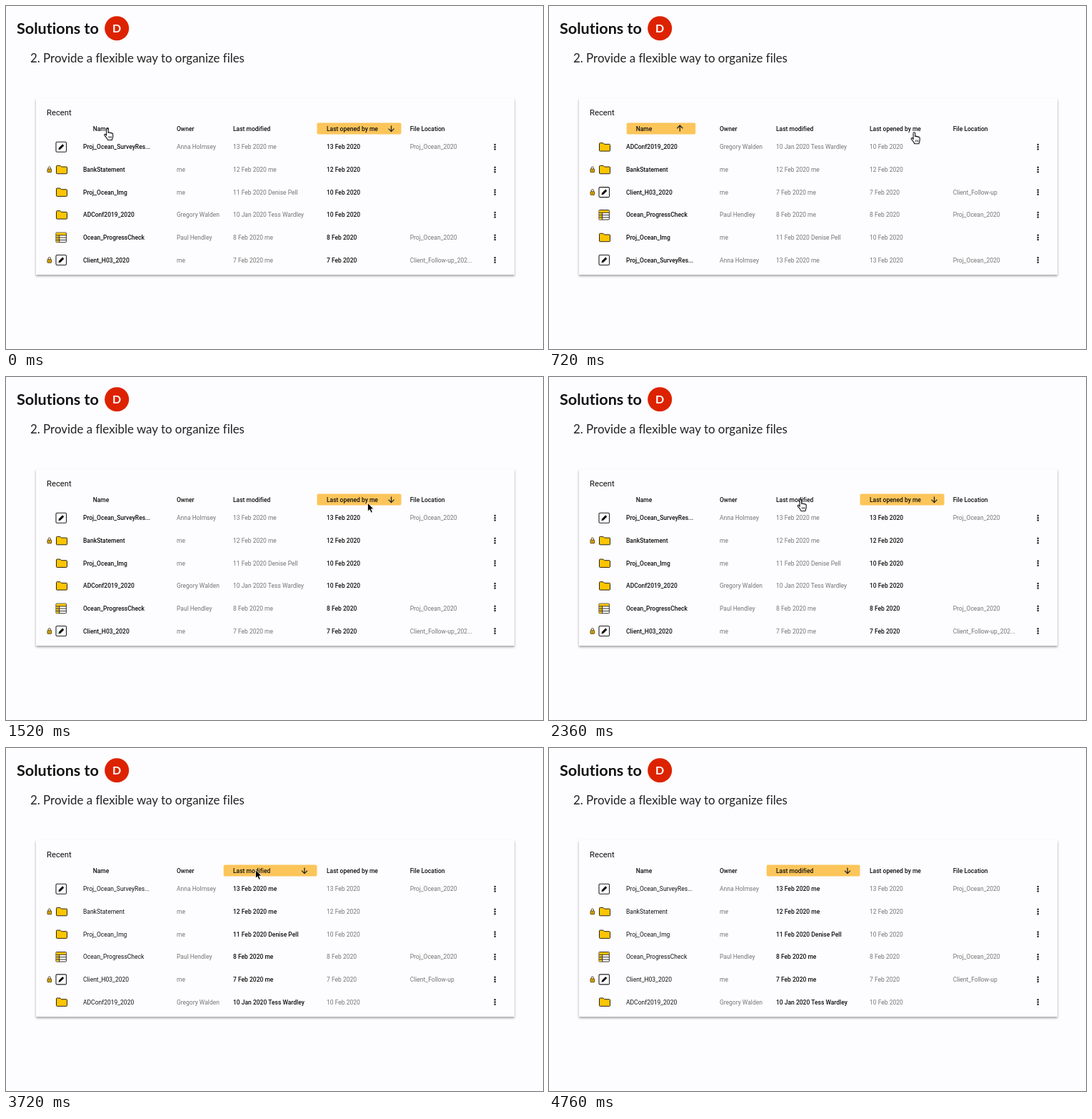
These frames come from a looping animation (752x480 px, 4.88 s). An HTML page:

```html
<!DOCTYPE html>
<html lang="en">
<head>
<meta charset="utf-8">
<title>Sortable file list</title>
<style>
  html, body { margin: 0; width: 100%; height: 100%; overflow: hidden; background: #fdfcfe; }
  svg { position: absolute; left: 0; top: 0; font: 8.5px Roboto, sans-serif; fill: #757575; font-variant-ligatures: none; }
  .card { position: absolute; left: 42px; top: 129px; width: 670px; height: 247px;
          background: #fdfcfe; box-shadow: 0 2px 3px rgba(0, 0, 0, .36); }
  .title { font-family: Lato, sans-serif; font-size: 21.6px; font-weight: 700; fill: #111; }
  .subtitle { font-family: Lato, sans-serif; font-size: 16.9px; fill: #222; }
  .badge { font-family: Lato, sans-serif; font-size: 16px; font-weight: 700; fill: #fff; }
  .recent { font-size: 11.3px; fill: #111; }
  .dark { fill: #151515; }
  .medium { font-weight: 500; fill: #111; }
</style>
</head>
<body>
<div class="card"></div>
<svg width="752" height="480" viewBox="0 0 752 480">
  <defs>
    <clipPath id="cardClip"><rect x="42" y="129" width="670" height="248"/></clipPath>
    <g id="doc" stroke="#222">
      <rect x="70" y="-7" width="14.5" height="14" rx="1.5" fill="#fff" stroke-width="1.1"/>
      <path d="M73.4 4l.8-3 5-5 2.1 2.1-5 5z" fill="#111" stroke="none"/>
    </g>
    <g id="folder" stroke="#2b2410" stroke-linejoin="round">
      <path d="M70.5 5V-4.6q0-1 1-1h4.4l1.6 1.7h7q1 0 1 1V5q0 .8-1 .8H71.5q-1 0-1-.8z" fill="#fdc500"/>
    </g>
    <g id="sheet" stroke="#333">
      <rect x="70" y="-6.8" width="14.4" height="13.6" rx=".8" fill="#fff"/>
      <path d="M70.5-6.3h13.4v3.4H70.5zM70.5-3h4.2v9.3h-4.2z" fill="#fdc500" stroke="none"/>
      <path d="M70-3h14.4M70 .3h14.4M70 3.6h14.4M74.7-3V6.8" fill="none"/>
    </g>
    <g id="lock" stroke="#4a3a08" stroke-width=".9">
      <path d="M59.1-.8V-2.3a1.7 1.7 0 0 1 3.4 0v1.5" fill="none"/>
      <rect x="58" y="-.9" width="5.6" height="4.6" rx=".6" fill="#e9b000"/>
      <path d="M60.8.7v1.3"/>
    </g>
    <g id="more" fill="#222">
      <circle cx="684.7" cy="-3.2" r="1.25"/><circle cx="684.7" r="1.25"/><circle cx="684.7" cy="3.2" r="1.25"/>
    </g>
  </defs>

  <text class="title" x="15" y="38.5">Solutions to</text>
  <circle cx="155.2" cy="31.3" r="17" fill="#dd2200"/>
  <text class="badge" x="155.2" y="37" text-anchor="middle">D</text>
  <text class="subtitle" x="34" y="79">2. Provide a flexible way to organize files</text>
  <text class="recent" x="57" y="153.4">Recent</text>

  <g id="views"></g>
  <g clip-path="url(#cardClip)">
    <path id="arrow" d="M0 0V11.8L2.7 9.3 4.7 13.8 6.8 12.9 4.9 8.5H8.6Z" fill="#000" stroke="#fff" stroke-width=".8"/>
    <g id="hand" fill="#fff" stroke="#111" stroke-width="1.1" stroke-linejoin="round">
      <path d="M3.6 10.3V1.8a1.3 1.3 0 0 1 2.6 0V6.5c.3-1 2.3-.9 2.4.3.4-.8 2.1-.6 2.2.5.5-.6 1.9-.2 1.9 1v3.2c0 2-1 2.6-1.2 5H5.4C5.1 14.5 2.9 12.500 1 10.200 0 8.800 1.800 7.600 2.800 8.800z"/>
      <path d="M6.900 11v3M8.700 11v3M10.400 11v3" fill="none" stroke-width=".7"/>
    </g>
  </g>
</svg>

<script>
const LOOP = 4880;
const $ = id => document.getElementById(id);

const columns = [
  { x: 108, label: 'Name', labelX: 121.7 },
  { x: 239, label: 'Owner' },
  { x: 318, label: 'Last modified' },
  { x: 449, label: 'Last opened by me' },
  { x: 565.7, label: 'File Location' }
];

const files = {
  survey:   { icon: 'doc', cells: ['Proj_Ocean_SurveyRes...', 'Anna Holmsey', '13 Feb 2020 me', '13 Feb 2020', 'Proj_Ocean_2020'] },
  bank:     { icon: 'folder', locked: true, cells: ['BankStatement', 'me', '12 Feb 2020 me', '12 Feb 2020', ''] },
  img:      { icon: 'folder', cells: ['Proj_Ocean_Img', 'me', '11 Feb 2020 Denise Pell', '10 Feb 2020', ''] },
  conf:     { icon: 'folder', cells: ['ADConf2019_2020', 'Gregory Walden', '10 Jan 2020 Tess Wardley', '10 Feb 2020', ''] },
  progress: { icon: 'sheet', cells: ['Ocean_ProgressCheck', 'Paul Hendley', '8 Feb 2020 me', '8 Feb 2020', 'Proj_Ocean_2020'] },
  client:   { icon: 'doc', locked: true, cells: ['Client_H03_2020', 'me', '7 Feb 2020 me', '7 Feb 2020', 'Client_Follow-up'] }
};

const views = {
  opened:   { column: 3, left: 435.5, width: 118, arrowX: 539.5, order: 'survey bank img conf progress client' },
  name:     { column: 0, left: 108.7, width: 96.5, arrowX: 183.3, up: true, order: 'conf bank client progress img survey' },
  modified: { column: 2, left: 304.7, width: 130.8, arrowX: 418, order: 'survey bank img progress client conf' }
};

const text = (x, y, value, style = '') => `<text x="${x}" y="${y}" class="${style}">${value}</text>`;

function rowMarkup(key, i, view) {
  const file = files[key];
  const cells = file.cells.map((value, c) => {
    const nameStyle = view.column === 2 ? 'dark' : 'medium';
    const style = c === 0 ? nameStyle : c === view.column ? 'medium' : '';
    const shown = key === 'client' && c === 4 && view.column === 3 ? value + '_202...' : value;
    return text(columns[c].x, 3, shown, style);
  });
  return `<g transform="translate(0 ${197.3 + 31.65 * i})">
    ${file.locked ? '<use href="#lock"/>' : ''}<use href="#${file.icon}"/><use href="#more"/>${cells.join('')}</g>`;
}

function viewMarkup([id, view]) {
  const head = columns.map(c => text(c.labelX || c.x, 174.8, c.label, 'medium')).join('');
  return `<g id="${id}">
    <rect x="${view.left}" y="163.5" width="${view.width}" height="16" rx="2" fill="#fcc55a"/>
    <path d="M0-4V4M-4 .2L0 4.2 4 .2" transform="translate(${view.arrowX} 171.4) scale(1 ${view.up ? -1 : 1})"
      fill="none" stroke="#222" stroke-width="1.3"/>
    ${head}${view.order.split(' ').map((key, i) => rowMarkup(key, i, view)).join('')}</g>`;
}

$('views').innerHTML = Object.entries(views).map(viewMarkup).join('');

// Each move: start, end, from, to, easing
const easeInOut = p => p * p * (3 - 2 * p);
const easeIn = p => p ** 1.3;
const moves = [
  [160, 560, [137, 171], [506.5, 176.3], easeInOut],
  [1680, 2160, [506.5, 176.3], [347.5, 171], easeInOut],
  [3120, 3200, [347.5, 171], [349.5, 170.5], easeInOut],
  [3760, 4180, [349.5, 170.5], [394, 378], easeIn]
];

function cursorAt(t) {
  let place = moves[0][2];
  for (const [start, end, from, to, ease] of moves) {
    if (t < start) break;
    const p = ease(Math.min(1, (t - start) / (end - start)));
    place = from.map((v, i) => v + (to[i] - v) * p);
  }
  return place;
}

function draw() {
  const t = performance.now() % LOOP;
  const active = t < 40 ? 'opened' : t < 1520 ? 'name' : t < 3200 ? 'opened' : 'modified';
  for (const id in views) $(id).style.display = id === active ? '' : 'none';

  const pointing = t < 40 || t >= 540 && t < 1520 || t >= 2120 && t < 3200;
  const place = `translate(${cursorAt(t)})`;
  $('hand').style.display = pointing ? '' : 'none';
  $('arrow').style.display = pointing || t >= 4180 ? 'none' : '';
  $('hand').setAttribute('transform', place);
  $('arrow').setAttribute('transform', place);
  requestAnimationFrame(draw);
}
draw();
</script>
</body>
</html>
```
